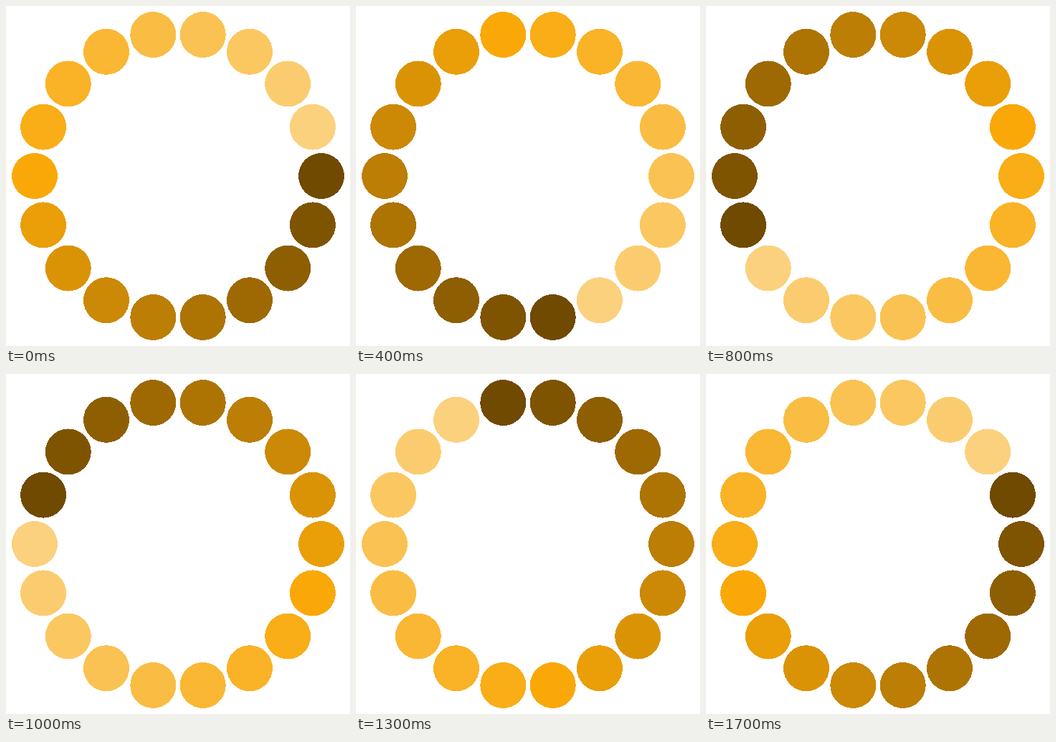
Animation of 480x474 px, one loop 1800 ms. Source, as an HTML page:

```html
<!DOCTYPE html>
<html lang="en">
<head>
<meta charset="utf-8">
<title>Ring spinner</title>
<style>
  html, body { margin: 0; width: 100%; height: 100%; overflow: hidden; background: #fff; }
  svg { display: block; }
</style>
</head>
<body>
<svg width="480" height="474" viewBox="0 0 480 474" shape-rendering="crispEdges"></svg>
<script>
const COUNT = 18, STEP_MS = 100;
const DARK = [112, 74, 0], AMBER = [249, 168, 8], PALE = [251, 209, 126];

const mix = (a, b, k) => `rgb(${a.map((v, i) => Math.round(v + (b[i] - v) * k))})`;
const shades = Array.from({ length: COUNT }, (_, i) =>
  i < 9 ? mix(DARK, AMBER, i / 9) : mix(AMBER, PALE, (i - 9) / 8));

const svg = document.querySelector('svg');
const dots = shades.map((_, i) => {
  const angle = i / COUNT * 2 * Math.PI;
  const dot = document.createElementNS(svg.namespaceURI, 'circle');
  dot.setAttribute('cx', 240 + 200 * Math.cos(angle));
  dot.setAttribute('cy', 237 + 200 * Math.sin(angle));
  dot.setAttribute('r', 32);
  return svg.appendChild(dot);
});

const start = performance.now();
function draw() {
  const elapsed = Math.max(0, performance.now() - start);
  const head = Math.floor(elapsed / STEP_MS) % COUNT;
  dots.forEach((dot, i) => dot.setAttribute('fill', shades[(i - head + COUNT) % COUNT]));
  requestAnimationFrame(draw);
}
draw();
</script>
</body>
</html>
```
